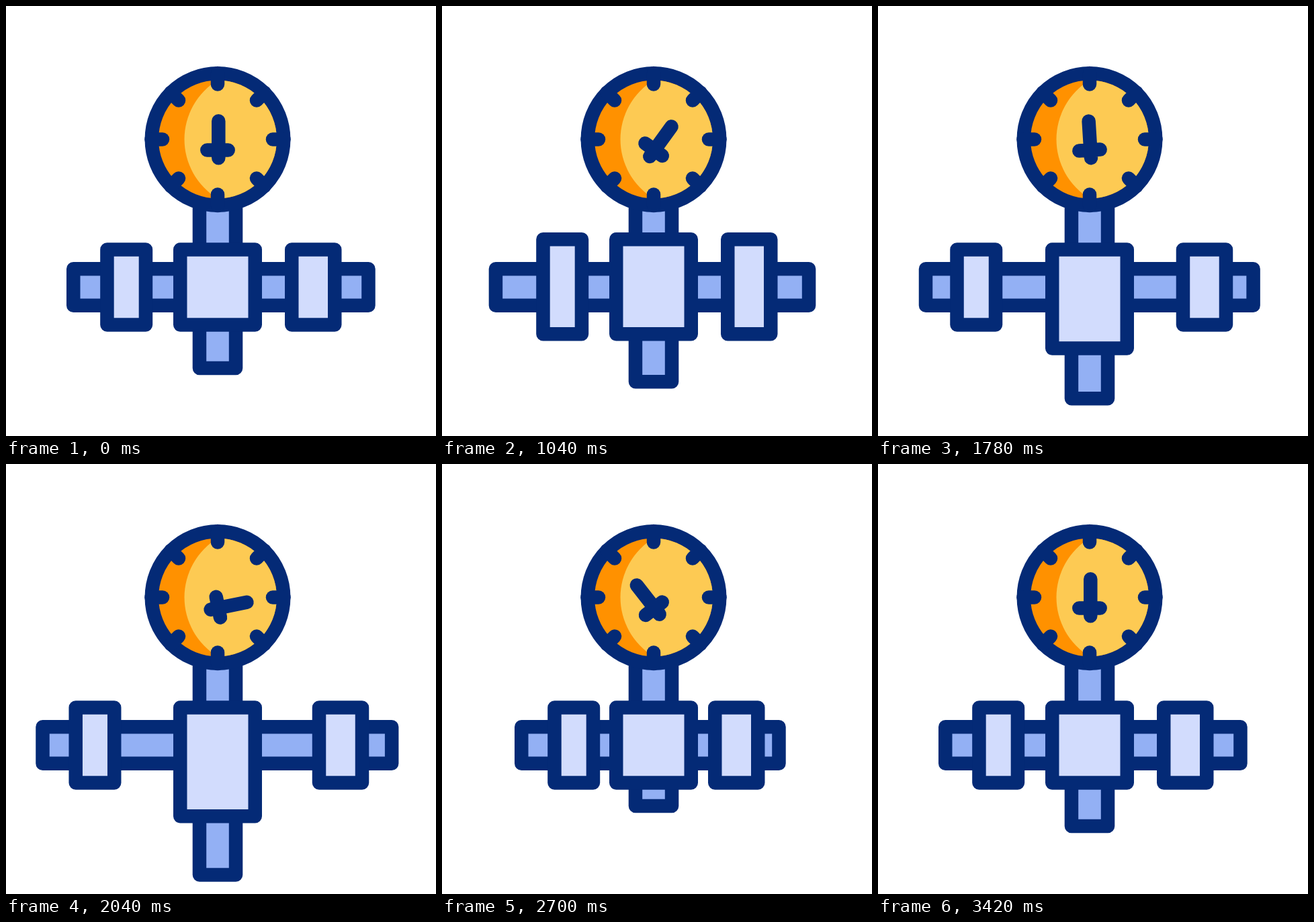
Animation, 640 px wide and 640 px high, one loop 3600 ms. Source, as an HTML page:

```html
<!DOCTYPE html>
<html lang="en">
<head>
<meta charset="utf-8">
<title>Pressure gauge</title>
<style>
  html, body { margin: 0; width: 100%; height: 100%; overflow: hidden; background: #fff; }
  svg { display: block; width: 100vw; height: 100vh; }
  .line, rect { stroke: #042a76; stroke-width: 20.5; stroke-linecap: round; stroke-linejoin: round; }
  .pipe { fill: #93b0f4; }
  .block { fill: #d2dcfd; }
</style>
</head>
<body>
<svg viewBox="0 0 640 640">
  <rect id="stem" class="pipe"/>
  <rect id="pipe" class="pipe"/>
  <rect id="left" class="block"/>
  <rect id="right" class="block"/>
  <rect id="center" class="block"/>
  <circle class="line" cx="315" cy="198.5" r="98.2" fill="#ff9100"/>
  <path d="M315 110.5A88 88 0 0 1 315 286.5A103 103 0 0 1 315 110.5" fill="#fdca53"/>
  <g id="ticks" class="line"></g>
  <path id="needle" class="line" fill="none" d="M316.3 171.3V226.2M299.3 214.5H330.7"/>
</svg>
<script>
const LOOP = 3600;
const bodyTimes = [300, 790, 1370, 2015, 2700, 3420];
const needleTimes = [500, 900, 1500, 2130, 2700, 3420];

// Offsets from the rest pose at each key time
const offsets = {
  pipeLeft: [0, -40.5, 10, -46, 18, 0],
  pipeRight: [0, 23, -18, 35, -38, 0],
  stemBottom: [0, 47, -20, 73, -30, 0],
  blockTop: [0, -25.3, 0, 0, 0, 0],
  flangeBottom: [0, 23, 0, 0, 0, 0],
  centerBottom: [0, 23, 0, 50, 0, 0],
  leftShift: [0, 0, 0, -47, 17, 0],
  rightShift: [0, 0, 0, 41, -19, 0]
};
const needleAngles = [0, 53, -69, 87, -38, 0];

const el = id => document.getElementById(id);

function track(times, values, t) {
  if (t <= times[0]) return values[0];
  const i = times.findIndex(time => time > t);
  if (i < 0) return values.at(-1);
  const u = (t - times[i - 1]) / (times[i] - times[i - 1]);
  return values[i - 1] + (values[i] - values[i - 1]) * u * u * (3 - 2 * u);
}

// Places a rectangle by its outer edges
function setBox(id, left, top, right, bottom) {
  const inset = 10.25;
  const box = { x: left + inset, y: top + inset, width: right - left - 2 * inset, height: bottom - top - 2 * inset };
  for (const key in box) el(id).setAttribute(key, box[key]);
}

function draw(t) {
  const o = {};
  for (const key in offsets) o[key] = track(bodyTimes, offsets[key], t);
  const top = 352.3 + o.blockTop;
  const flangeBottom = 484.7 + o.flangeBottom;
  setBox("stem", 277.7, 200, 352.3, 549.3 + o.stemBottom);
  setBox("pipe", 90 + o.pipeLeft, 381, 549.7 + o.pipeRight, 456);
  setBox("left", 140.2 + o.leftShift, top, 218.2 + o.leftShift, flangeBottom);
  setBox("right", 415 + o.rightShift, top, 499.5 + o.rightShift, flangeBottom);
  setBox("center", 249, top, 381, 484.7 + o.centerBottom);
  el("needle").setAttribute("transform", `rotate(${track(needleTimes, needleAngles, t)} 316.3 214.3)`);
}

for (let a = 0; a < 360; a += 45) {
  el("ticks").innerHTML += `<path d="M315 100V116.5" transform="rotate(${a} 315 198.5)"/>`;
}

const start = performance.now();
function tick() {
  draw((performance.now() - start) % LOOP);
  requestAnimationFrame(tick);
}
tick();
</script>
</body>
</html>
```
